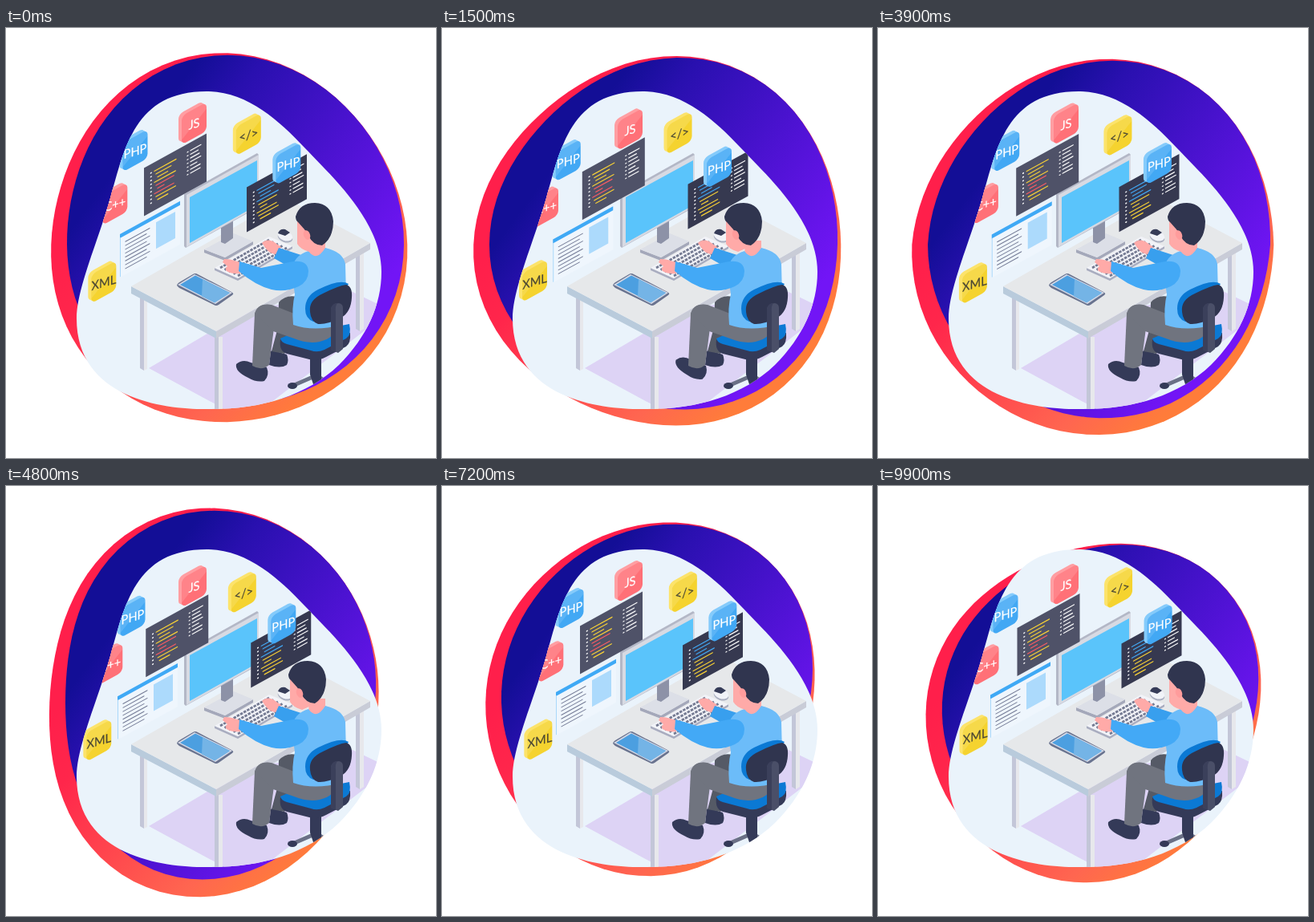
An HTML page that plays this animation: 536x536 px, repeating every 10 s.

```html
<!DOCTYPE html>
<html lang="en">
<head>
<meta charset="utf-8">
<title>Developer at a desk</title>
<style>
html, body { margin: 0; width: 100%; height: 100%; overflow: hidden; background: #fff; }
svg { display: block; width: 100vw; height: 100vh; }
text { font: 15.500px Lato, "Open Sans", sans-serif; text-anchor: middle; }
</style>
</head>
<body>
<svg viewBox="0 0 536 536" stroke-linecap="round" stroke-linejoin="round">
<defs>
  <linearGradient id="violet" gradientUnits="userSpaceOnUse" x1="172" y1="129" x2="456" y2="342">
    <stop stop-color="#130e96"/><stop offset=".18" stop-color="#2910af"/><stop offset="1" stop-color="#7215f6"/>
  </linearGradient>
  <linearGradient id="fire" gradientUnits="userSpaceOnUse" x1="170" y1="170" x2="420" y2="420">
    <stop stop-color="#ff1f4b"/><stop offset=".2" stop-color="#ff264b"/>
    <stop offset=".78" stop-color="#ff6650"/><stop offset="1" stop-color="#ff7c3a"/>
  </linearGradient>
  <clipPath id="window"><path id="pane" d="M250 79C300 79 340 115 372 149S468 240 468 304C468 345 450 385 415 420C375 458 320 475 255 475C205 476 88 466 88 362C88 325 115 265 130 212C148 150 160 79 250 79Z"/></clipPath>
</defs>
<path id="back" fill="url(#fire)"/>
<path id="front" fill="url(#violet)"/>
<use href="#pane" fill="#eaf3fb"/>
<g clip-path="url(#window)">
  <path fill="#ddd3f5" d="M178 424L300 352 430 328 480 352 300 490Z"/>

  <!-- desk -->
  <path fill="#c3c6d8" d="M167 333h5v94l-5-3zM260 385h5v95h-5zM436 280h5v98l-5-3z"/>
  <path fill="#e7e8ec" d="M172 335h4v90l-4 2zM265 385h5v95h-5zM441 280h5v95l-5 3z"/>
  <path fill="#b9cbdc" d="M156 322L262 378v9L156 331Z"/>
  <path fill="#c9ccd7" d="M262 378L454 268v8L262 387Z"/>
  <path fill="#e6e8ea" d="M156 322L348 212 454 268 262 378Z"/>

  <!-- monitor -->
  <path fill="#a4a8ba" d="M247 276l26 10 35-20v4l-35 20-26-10z"/>
  <path fill="#dcdfe7" d="M247 276l37-20 24 10-35 20z"/>
  <path fill="#8d92a7" d="M268 246l15-8v24l-10 7-5-2z"/>
  <path fill="#b3b7c6" d="M222 207l91-51 2 2v65l-91 51-2-2z"/>
  <path fill="#d7dae3" d="M225 208l90-50v64l-90 51z"/>
  <path fill="#5ac4fb" d="M229 211l84-46v56l-84 47z"/>

  <g id="browser">
    <path fill="#eff6fd" d="M0 0h75v54h-75z"/>
    <path fill="#3fa9f5" d="M0 0h75v5h-75z"/>
    <path stroke="#a9d8fa" d="M.5 5v48"/>
    <path fill="#acdafc" d="M45 10h24v33h-24z"/>
  </g>
  <g id="redPanel"><path fill="#4f5268" d="M0 0h78v60h-78z"/></g>
  <g id="bluePanel"><path fill="#363950" d="M0 0h75v56h-75z"/></g>
  <g id="icons"></g>

  <!-- keyboard, tablet, mouse -->
  <path fill="#a9adc0" d="M260 299l29 13 68-40v3l-68 40-29-13z"/>
  <path fill="#f2f3f8" d="M260 299l68-39 29 12-68 40z"/>
  <path id="keys" stroke="#747a92" stroke-width="2.800" stroke-linecap="butt" stroke-dasharray="3.500 1.300"/>
  <path fill="#69738f" d="M213 321q0-2 3-4l17-10q3-2 6 0l42 22q4 2 1 4l-17 12q-3 2-6 0l-43-21z"/>
  <path fill="#d5d9e6" d="M214 320l21-13 47 23-21 14z"/>
  <path fill="#4c9fe0" d="M217 320l19-11.500 43 21.500-19 12z"/>
  <path fill="#74b4e6" d="M245 313l34 17.500-19 12-16-8z"/>
  <ellipse cx="348" cy="261" rx="9.500" ry="6" transform="rotate(20 348 261)" fill="#a9aec0"/>
  <ellipse cx="348" cy="259" rx="9.500" ry="6" transform="rotate(20 348 259)" fill="#f1f3f8"/>
  <path fill="#363c58" d="M339 256q2-6 9-5l6 4-6 4z"/>

  <!-- far leg and arm -->
  <path fill="#343a58" d="M330 403q4-4 10 1l10 3q3 7 0 13-8 5-22 0z"/>
  <path fill="#555a66" d="M340 342q12-13 30-4l10 30-33 38-16-3 8-30z"/>
  <path fill="#ffaaa8" d="M319 268q6-6 14-2l10 7-6 9q-8 0-13-7z"/>
  <path fill="#389fee" d="M340 274l31 10 10 12-24 4-23-13z"/>

  <!-- chair below -->
  <path stroke="#6a7086" stroke-width="5" d="M387 433l-30 13M387 433l26 17"/>
  <ellipse cx="357" cy="446" rx="6" ry="4" fill="#343a58"/>
  <path fill="#343a58" d="M379 404h14v40h-10l-4-12z"/>
  <path fill="#343a58" d="M342 388q-2 15 8 18l32 8q8 1 17-4l25-13q6-4 5-17z"/>
  <path fill="#0b79d4" d="M342 387q25-13 45-10l41-8q3 14-4 18l-27 14q-9 4-17 1l-30-8q-7-2-8-7z"/>

  <!-- near leg -->
  <path id="shoe" fill="#343a58" d="M287 419q8-7 18-2l20 6q4 10-3 17-10 2-20-4-17-8-15-17z"/>
  <path id="calf" fill="#70747f" d="M310 356q4-13 20-11l6 14-8 61q-9 8-21 1z"/>
  <path fill="#70747f" d="M310 356q4-14 21-11l46 18 34 9q0 14-20 19-15 3-32-4l-26-9z"/>

  <!-- torso and near arm -->
  <path fill="#ffaaa8" d="M378 265h20v18l-10 8-11-7z"/>
  <path fill="#6cbcf9" d="M377 278q10 14 21-4 22 5 25 20l1 40-6 36q-34 9-60 0-2-22 2-38l-4-30q3-19 21-24z"/>
  <path fill="#ffaaa8" d="M272 288q8 0 13 2l10 3-3 13q-10 1-17-3-3-3 1-6l-6-5z"/>
  <path fill="#43a9f6" d="M291 291q14 4 27 8l40-8q18-2 19 12 0 13-12 19-17 8-34 4-20-5-41-23z"/>
  <g id="head">
    <path fill="#ffaaa8" d="M363 240h30l3 31-18 8q-11-3-15-10z"/>
    <path fill="#30354f" d="M361 235q5-17 24-17 21 1 23 23 0 21-14 30-11 0-17-12l-5-8-8-9q-3-2-3-7z"/>
    <ellipse cx="375" cy="258" rx="4" ry="6" transform="rotate(-20 375 258)" fill="#ff9c9c"/>
  </g>

  <!-- chair back -->
  <path fill="#0b79d4" d="M373 350q0-16 16-24 28-14 38-7l-30 47h-14q-10-4-10-16z"/>
  <path fill="#30354f" d="M379 354q-2-15 16-23 20-10 29-11 8 2 7 16-1 18-13 25-18 9-29 8-9-3-10-15z"/>
  <path fill="#4a4f68" d="M405 351q1-8 10-8 5 1 5 6v51l-6 5-9-4z"/>
  <path fill="#3b405b" d="M405 351q1-8 8-8-3 4-2 11v50l-6-3z"/>
</g>
</svg>
<script>
const $ = id => document.getElementById(id);
const { PI, sin, cos, floor, abs } = Math;
const TAU = 2 * PI, LOOP = 10000;
const place = (id, x, y) => $(id).setAttribute("transform", `matrix(1 -.55 0 1 ${x} ${y})`);
const move = (el, x, y) => el.setAttribute("transform", `translate(${x} ${y})`);

// Blob poses: a circle, squeezed by an oval and a three-lobed wave
const poses = [
  { at: 0, size: 214, x: 16, y: -14, oval: -4, lobe: 2 },
  { at: 1500, size: 217, x: 14, y: -11, oval: 0, lobe: -6 },
  { at: 2900, size: 206, x: 30, y: -12, oval: 5, lobe: -13 },
  { at: 4800, size: 211, x: -6, y: -10, oval: -18, lobe: 5 },
  { at: 7200, size: 200, x: 1, y: -15, oval: -8, lobe: -3 },
  { at: 8900, size: 202, x: 15, y: -6, oval: -15, lobe: -1 },
  { at: 9900, size: 197, x: 10, y: 1, oval: -1, lobe: -2 }];

function poseAt(t) {
  const i = Math.max(1, poses.findIndex(p => p.at >= t));
  const from = poses[i - 1], to = poses[i], k = (t - from.at) / (to.at - from.at);
  const mix = name => from[name] + (to[name] - from[name]) * k;
  return {
    x: mix("x"), y: mix("y"), oval: mix("oval"), lobe: mix("lobe"),
    size: mix("size"), swell: 12 * sin(PI * k), turn: t / 1000
  };
}

// The rim makes the rear blob thicker towards the lower left
function blob({ x, y, size, swell, oval, lobe, turn }, rim) {
  const points = Array.from({ length: 90 }, (_, i) => {
    const a = i * TAU / 90;
    const r = size + swell * (1 + Math.min(0, sin(a))) + x * cos(a) + y * sin(a)
      + oval * cos(2 * a) - turn * sin(2 * a)
      + lobe * cos(3 * a) + (4 - .8 * turn) * sin(3 * a)
      + rim * (1 + cos(a - 2.27));
    return [268 + r * cos(a), 270 + r * sin(a)];
  });
  return "M" + points.join("L") + "Z";
}

// Lines on the panels, the page and the keyboard
const line = (x, y, w, color, width = 1.3) =>
  `<path d="M${x} ${y}h${w}" stroke="${color}" stroke-width="${width}"/>`;

function addCode(id, first, second) {
  let out = "";
  for (let i = 0; i < 9; i++) {
    const y = 11 + i * 4.7, indent = i % 3 * 2;
    out += line(8.5, y, .6, "#fff", 1.6)
      + line(13 + indent, y, 12 + 15 * abs(cos(i * 2.2)) - indent, i < 4 ? first : i < 7 ? second : "#fbd334");
    if (i < 7) out += line(54, y - 1, 1, "#fff") + line(58, y - 1, 7 + 6 * abs(cos(i * 2)), "#fff");
  }
  $(id).innerHTML += out;
}
addCode("redPanel", "#fbd334", "#ff5b62");
addCode("bluePanel", "#42a9f5", "#fbd334");

let prose = "", keys = "";
for (let i = 0; i < 8; i++) prose += line(7, 13 + i * 4.8, 30 - i % 2 * 4, "#737a94", 1.1);
for (let i = 0; i < 5; i++) keys += `M${267 + i * 5.5} ${299 + i * 2.5}l61 -35`;
$("browser").innerHTML += prose;
$("keys").setAttribute("d", keys);

// Tiles: label, colours, centre, and motion over one cycle
const glide = p => (1 - cos(TAU * p)) / 2;
const slide = (dx, dy) => p => [dx * glide(p), dy * glide(p)];
const orbit = (ax, ay, lag) => p => [ax * cos(TAU * (p + .1)), ay * cos(TAU * (p - lag))];
const blue = ["#42a8f4", "#85cbfb", "#fff"], red = ["#ff7077", "#ff9ea2", "#fff"],
  yellow = ["#f5d32f", "#fce36b", "#4a4734"];

function tile(label, [face, rim, ink], x, y, path) {
  const el = document.createElementNS("http://www.w3.org/2000/svg", "g");
  const box = (dx, dy, c) =>
    `<rect x="-15.5" y="-18" width="31" height="36" rx="6" fill="${c}" transform="matrix(1 -.55 0 1 ${dx} ${dy})"/>`;
  el.innerHTML = box(-4, -2, rim) + box(-2, -1, rim) + box(0, 0, face) +
    `<path fill="#fff" opacity=".13" transform="matrix(1 -.55 0 1 0 0)" d="M-15.5 12v-24q0-6 6-6h19q6 0 6 6v2z"/>
    <text y="6" fill="${ink}" stroke="${ink}" stroke-width=".2" transform="matrix(.95 -.28 0 1 0 0)">${label}</text>`;
  $("icons").append(el);
  return { el, x, y, path };
}
const tiles = [
  tile("PHP", blue, 161, 153, slide(-4, 13)),
  tile("JS", red, 234.5, 119, slide(0, 8)),
  tile("&lt;/&gt;", yellow, 299.5, 131, orbit(3.5, 4, .18)),
  tile("PHP", blue, 349, 172, orbit(3.5, 3, .57)),
  tile("C++", red, 133, 222, orbit(3.5, 3, .57)),
  tile("XML", yellow, 119, 315, orbit(3.5, 4, .18))
];

function draw(t) {
  const pose = poseAt(t);
  $("back").setAttribute("d", blob(pose, 12));
  $("front").setAttribute("d", blob(pose, 0));

  const p = t / 3600 % 1, u = glide(p);
  place("redPanel", 172 + 3 * u, 174.5 + 5 * u);
  place("bluePanel", 300 + 7 * u, 198.5 - 4 * u);
  place("browser", 142 - 4 * u, 257 + 7 * u);
  for (const { el, x, y, path } of tiles) {
    const [dx, dy] = path(p);
    move(el, x + dx, y + dy);
  }

  move($("head"), t / 1800 % 1 > .55 ? -9 : 0, 0);
  const lifted = p > .36 && p < .6;
  $("shoe").setAttribute("transform", lifted ? "translate(3 -2) rotate(5 325 435)" : "");
}

const start = performance.now();
function tick() {
  const t = Math.max(0, performance.now() - start) % LOOP;
  draw(floor(t / 100) * 100);
  requestAnimationFrame(tick);
}
tick();
</script>
</body>
</html>
```
